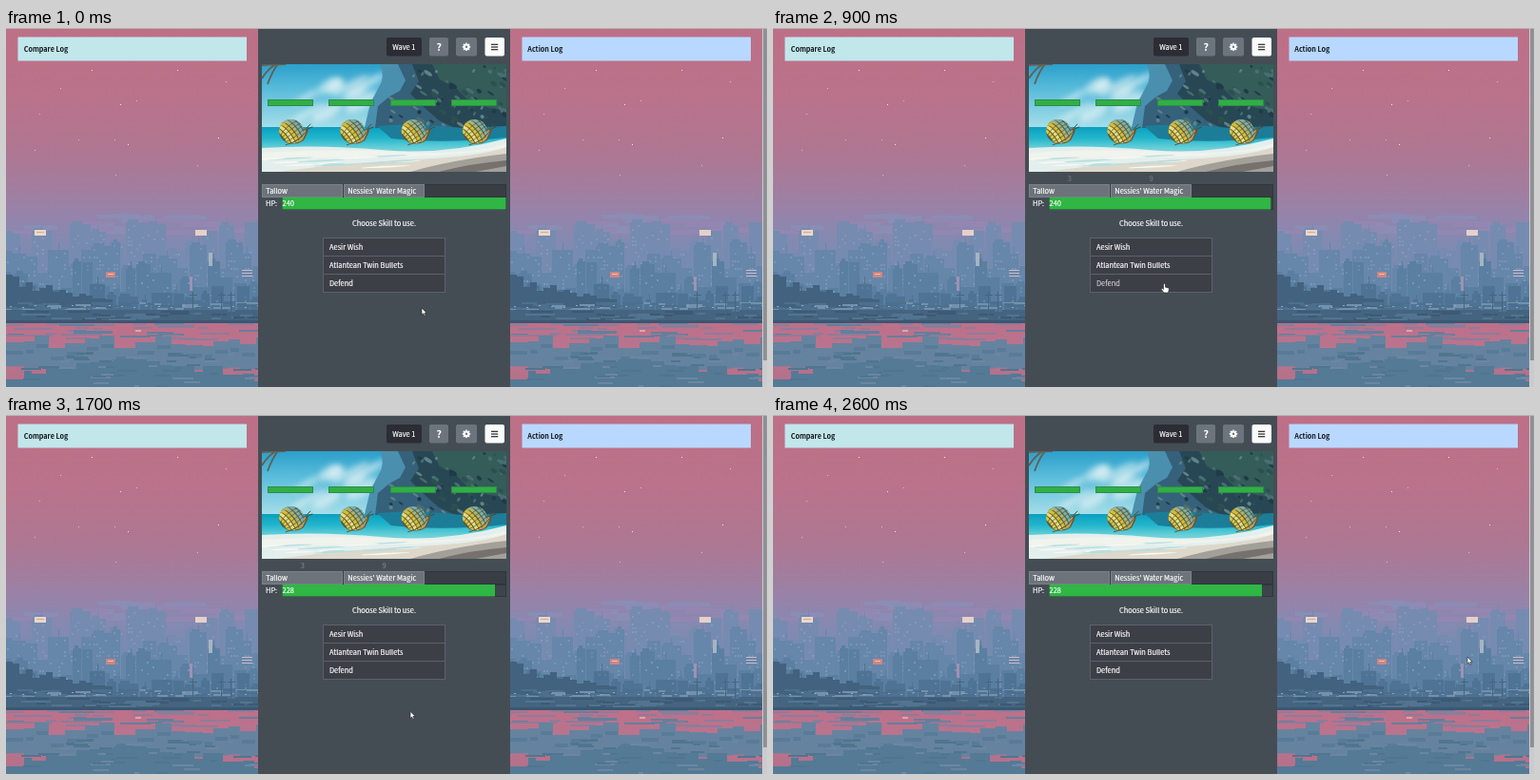
An HTML page with a canvas that plays this animation: 800x377 px, repeating every 2.7 s.

```html
<!DOCTYPE html>
<html lang="en">
<head>
<meta charset="utf-8">
<title>Wave battle</title>
<style>
html, body { margin: 0; width: 100%; height: 100%; overflow: hidden; background: #454d54; }
canvas, svg { position: absolute; left: 0; top: 0; width: 800px; height: 377px; display: block; }
text {
  font: 500 7.45px "Noto Sans CJK JP", "Noto Sans CJK SC", "Noto Sans CJK", "Noto Sans", sans-serif;
  fill: #fff; stroke: #fff; stroke-width: .18px;
}
.log { font-weight: 700; font-size: 7.2px; fill: #101418; stroke: none; }
.mid { text-anchor: middle; }
</style>
</head>
<body>
<canvas id="stage" width="800" height="377"></canvas>
<svg viewBox="0 0 800 377">
  <text class="log" x="18.7" y="24.8">Compare Log</text>
  <text class="log" x="548.3" y="24.8">Action Log</text>
  <text class="mid" x="418.3" y="22.7">Wave 1</text>
  <text class="mid" x="455.2" y="23.7" style="font-size:10.5px;font-weight:900">?</text>
  <g id="damage">
    <text class="mid" x="311.8" y="160.8">3</text>
    <text class="mid" x="397.5" y="160.8">9</text>
  </g>
  <text x="273.3" y="173.6">Tallow</text>
  <text x="359.3" y="173.6">Nessies' Water Magic</text>
  <text x="273" y="187">HP:</text>
  <rect id="bar" x="290.5" y="178" width="235" height="12.5" fill="#2fb644"/>
  <text id="hp" x="290.6" y="187">240</text>
  <text class="mid" x="397.5" y="207.8">Choose Skill to use.</text>
  <text x="340" y="232.5">Aesir Wish</text>
  <text x="340" y="251.7">Atlantean Twin Bullets</text>
  <text id="defend" x="340" y="270.8">Defend</text>
  <path id="arrow" d="M0 0V7.2L1.7 5.7 2.9 8.3 4.1 7.7 2.9 5.2H5.2Z" fill="#fff" stroke="#171b20" stroke-width=".6"/>
  <path id="hand" d="M-1 0Q0-1 1 0V3.2L4 4Q5 4.4 4.8 5.5L4 9H-.6L-3.2 5.6Q-3.2 4.3-1.9 4.7L-1 5.5Z" fill="#fff" stroke="#20242a" stroke-width=".6"/>
</svg>
<script>
const $ = id => document.getElementById(id);
const ctx = $('stage').getContext('2d');

const seeded = s => () => (s = (s * 16807) % 2147483647) / 2147483647;

function box(c, x, y, w, h, fill, line) {
  c.fillStyle = fill;
  c.fillRect(x, y, w, h);
  if (line) {
    c.strokeStyle = line;
    c.lineWidth = 1;
    c.strokeRect(x + .5, y + .5, w - 1, h - 1);
  }
}

function shape(c, fill, d) {
  c.fillStyle = fill;
  c.fill(new Path2D(d));
}

function blob(c, fill, x, y, rx, ry, turn = 0) {
  c.fillStyle = fill;
  c.beginPath();
  c.ellipse(x, y, rx, ry, turn, 0, 7);
  c.fill();
}

function fade(c, y0, y1, ...stops) {
  const g = c.createLinearGradient(0, y0, 0, y1);
  stops.forEach(([at, color]) => g.addColorStop(at, color));
  return g;
}

function skyline(c, rnd, base, low, high, fill, lights, density) {
  for (let x = -4; x < 265;) {
    const w = 9 + Math.floor(rnd() * 14), h = low + Math.floor(rnd() * (high - low));
    const top = base - h;
    box(c, x, top, w, h, fill);
    if (rnd() < .5) box(c, x + 2, top - 3, w / 2 | 0, 3, fill);
    if (rnd() < .25) box(c, x + (w / 2 | 0), top - 8, 1, 8, fill);
    for (let wy = top + 3; wy < base - 3; wy += 4)
      for (let wx = x + 2; wx < x + w - 2; wx += 3)
        if (rnd() < density) box(c, wx, wy, 2, 2, lights[rnd() * lights.length | 0]);
    x += w + Math.floor(rnd() * 4) - 1;
  }
}

function cityTile() {
  const tile = document.createElement('canvas');
  tile.width = 265;
  tile.height = 377;
  const c = tile.getContext('2d'), rnd = seeded(4127);
  box(c, 0, 0, 265, 377, fade(c, 0, 310, [0, '#bd7087'], [.25, '#b9738b'], [.43, '#ae7792'],
    [.54, '#a27d9e'], [.63, '#9683aa'], [.72, '#838ab1'], [1, '#6b89ac']));

  const stars = [[120, 80], [114, 117], [231, 56], [90, 44], [76, 117], [30, 128], [128, 122],
    [137, 76], [35, 90], [223, 115], [201, 144], [115, 154], [180, 44], [57, 63]];
  stars.forEach(([x, y], i) => box(c, x, y, 1, 1, i % 3 ? '#e3bac5' : '#f6e4e6'));

  for (let i = 0; i < 26; i++)
    box(c, rnd() * 265 - 15 | 0, 194 + rnd() * 22 | 0, 12 + rnd() * 38 | 0, 4, i % 2 ? '#9387b2' : '#8a8db5');
  skyline(c, rnd, 300, 60, 98, '#768bb0', ['#8298bd', '#8094b8'], .12);
  skyline(c, rnd, 300, 42, 76, '#6686aa', ['#7398b8', '#7c92b4'], .16);
  skyline(c, rnd, 300, 22, 56, '#5a7fa1', ['#6c9cb6', '#6a8cae'], .14);
  skyline(c, rnd, 300, 8, 32, '#4e7394', ['#5d8ba8', '#5c7e9e'], .12);

  box(c, 30, 212, 12, 6, '#ecd8c8');
  box(c, 32, 214, 8, 1, '#d6a7a2');
  box(c, 199, 212, 12, 6, '#e5d1c9');
  box(c, 105, 256, 10, 6, '#cc8584');
  box(c, 107, 258, 6, 1, '#efc3a6');
  for (let y = 254; y < 262; y += 3) box(c, 248, y, 11, 1, '#cdbcc6');
  box(c, 193, 261, 3, 15, '#a091b4');
  box(c, 213, 236, 4, 14, '#a4b5c2');

  // docks in front of the city
  for (let x = 0; x < 110; x += 7) {
    const h = 8 + (12 + rnd() * 18) * (1 - x / 110) | 0;
    box(c, x, 294 - h, 7, h, '#42627f');
  }
  for (let i = 0; i < 60; i++)
    box(c, rnd() * 265 - 8 | 0, 288 + rnd() * 9 | 0, 6 + rnd() * 18 | 0, 2, i % 3 ? '#4d6f8e' : '#7391ac');
  box(c, 0, 296, 265, 12, '#45647f');
  for (let i = 0; i < 30; i++)
    box(c, rnd() * 265 - 8 | 0, 296 + rnd() * 10 | 0, 8 + rnd() * 24 | 0, 2, i % 2 ? '#3c5975' : '#527490');
  for (let x = 4; x < 265; x += 13) box(c, x, 291 + x % 3, 2, 1, '#8fa6ba');
  box(c, 0, 307, 265, 3, '#3b5772');
  [196, 226, 236].forEach(x => {
    box(c, x, 277, 1, 29, '#46667f');
    box(c, x - 3, 280, 8, 1, '#46667f');
  });

  // water, mirrored skyline and the nearer shore
  box(c, 0, 310, 265, 67, fade(c, 310, 377, [0, '#be7089'], [.4, '#b9748e'], [1, '#b46f89']));
  for (let i = 0; i < 34; i++)
    box(c, rnd() * 265 - 10 | 0, 310 + rnd() * 17 | 0, 9 + rnd() * 35 | 0, 2, i % 3 ? '#8d7c9a' : '#647f9c');
  for (let x = -3; x < 265;) {
    const w = 8 + rnd() * 15 | 0, top = 323 + rnd() * 14 | 0;
    box(c, x, top, w, 355 - top + rnd() * 5, '#65839f');
    box(c, x + 2, top + 9, w - 3, 4, '#587b98');
    x += w;
  }
  for (let x = -3; x < 265;) {
    const w = 8 + rnd() * 16 | 0, inner = 1 - Math.abs(x - 125) / 140;
    const top = 364 - inner * 22 + rnd() * 8 | 0;
    box(c, x, top, w, 377 - top, '#547a96');
    x += w;
  }
  for (let i = 0; i < 44; i++)
    box(c, rnd() * 265 | 0, 340 + rnd() * 36 | 0, 5 + rnd() * 18 | 0, 2, i % 3 ? '#50758f' : '#6d86a0');
  box(c, 136, 317, 6, 2, '#e1a4a8');
  return tile;
}

function beach(c) {
  const rnd = seeded(931);
  c.save();
  c.beginPath();
  c.rect(269, 38, 257, 113);
  c.clip();
  box(c, 269, 38, 257, 70, fade(c, 38, 106, [0, '#2b9fcb'], [.4, '#5bbddb'], [1, '#a8dfe9']));
  c.filter = 'blur(3px)';
  c.globalAlpha = .6;
  for (let i = 0; i < 9; i++)
    blob(c, '#ecf6f7', 315 + rnd() * 75, 52 + rnd() * 45, 9 + rnd() * 16, 3 + rnd() * 6, -.5);
  c.filter = 'none';
  c.globalAlpha = 1;
  box(c, 269, 104, 257, 47, fade(c, 104, 151, [0, '#0b9fc0'], [.25, '#22b6cc'], [.48, '#6bd0d8'], [1, '#b8e0df']));

  // headland in three depths
  shape(c, '#4a8fae', 'M393 38Q399 52 392 62L383 79 377 104H526V38Z');
  shape(c, '#35617a', 'M412 38L420 55 414 66 403 72 391 82 388 105H526V38Z');
  shape(c, '#284754', 'M427 38L434 56 425 69 438 82 455 97 476 107H526V38Z');
  shape(c, '#345c59', 'M448 38L456 54 474 64 486 76 508 84 526 86V38Z');
  for (let i = 0; i < 90; i++) {
    const x = 402 + rnd() * 124, y = 40 + rnd() * 62;
    if (x < 428 && y < 74) continue;
    blob(c, ['#203a49', '#476f72', '#5e8388', '#2c5050'][i % 4], x, y, 1 + rnd() * 4, 1 + rnd() * 1.5, .6);
  }
  shape(c, '#1c7d99', 'M390 103Q430 99 480 105L526 103V115Q460 122 405 116Z');

  // foam, sand and wet shade
  shape(c, '#e3efed', 'M269 126Q330 122 395 128T526 116V151H269Z');
  shape(c, '#f1f3ed', 'M269 131Q350 126 420 130T526 121V126Q460 136 395 136T269 139Z');
  shape(c, '#ded8cb', 'M285 151Q360 141 430 138T526 125V151Z');
  shape(c, '#a3a09a', 'M425 151Q466 139 526 132V151Z');
  shape(c, '#76716c', 'M455 151Q490 142 526 139V145L494 151Z');
  for (let i = 0; i < 14; i++)
    blob(c, i % 2 ? '#b5dfe1' : '#f8f8f3', 275 + rnd() * 150, 133 + rnd() * 13, 9 + rnd() * 17, .8, -.05);

  c.strokeStyle = '#665e50';
  c.lineWidth = 1.8;
  c.stroke(new Path2D('M269 39Q285 38 294 38M286 38Q280 45 275 59M284 38Q276 42 269 53'));
  c.restore();
}

function snail(c, x) {
  c.save();
  c.translate(x, 110);
  c.lineCap = 'round';
  c.strokeStyle = '#4b4938';
  c.lineWidth = 1;
  c.stroke(new Path2D('M14-5L18-9M15-4L20-6'));
  shape(c, '#65583c', 'M-8 10Q3 14 11 8L15 0 16-5 12-4 8 3Z');
  shape(c, '#c7a358', 'M0 10Q6 11 10 7L14-2 12-3 8 4Z');
  c.beginPath();
  c.ellipse(-2, -1.5, 13, 12.5, .4, 0, 7);
  c.fillStyle = '#60593a';
  c.fill();
  c.save();
  c.clip();
  c.rotate(-.65);
  const bands = ['#dac842', '#eadc7d', '#d5bd35', '#a9b477', '#78afae', '#85bbb8'];
  c.lineWidth = 3.3;
  bands.forEach((color, i) => {
    c.strokeStyle = color;
    c.beginPath();
    c.ellipse(-14 + i * 4.4, -1, 4.5, 14, 0, -1.5, 1.5);
    c.stroke();
  });
  c.strokeStyle = '#4d5a42';
  c.lineWidth = .7;
  for (let y = -9; y < 10; y += 4.5) {
    c.beginPath();
    c.moveTo(-14, y * .6);
    c.quadraticCurveTo(0, y * 1.3, 14, y * .7);
    c.stroke();
  }
  c.restore();
  c.strokeStyle = '#5c573b';
  c.lineWidth = 1;
  c.stroke();
  c.restore();
}

function gear(c, x, y) {
  c.fillStyle = '#fff';
  for (let i = 0; i < 8; i++) {
    c.save();
    c.translate(x, y);
    c.rotate(i * Math.PI / 4);
    c.fillRect(-.9, -4.2, 1.8, 2.5);
    c.restore();
  }
  c.strokeStyle = '#fff';
  c.lineWidth = 1.8;
  c.beginPath();
  c.arc(x, y, 2.2, 0, 7);
  c.stroke();
}

function pill(c, x, w, fill) {
  c.fillStyle = fill;
  c.beginPath();
  c.roundRect(x, 10, w, 19.5, 2);
  c.fill();
}

function drawStage() {
  const city = cityTile();
  ctx.drawImage(city, 0, 0);
  ctx.drawImage(city, 530, 0);
  box(ctx, 795, 0, 5, 377, '#c9cbce');
  box(ctx, 796, 0, 4, 349, '#8f9194');
  box(ctx, 265, 0, 265, 377, '#454d54');
  box(ctx, 0, 0, 800, 1, '#b2b2b5');
  box(ctx, 12.5, 9.5, 240.5, 25, '#c1e7eb');
  box(ctx, 542.5, 9.5, 240.5, 25, '#b9d8ff');

  pill(ctx, 400, 37, '#2b2c34');
  pill(ctx, 445, 20, '#6c757d');
  pill(ctx, 473, 22, '#6c757d');
  pill(ctx, 503.5, 20.5, '#fbfbfb');
  gear(ctx, 484, 19.8);
  [16.7, 19.4, 22.1].forEach(y => box(ctx, 510, y, 7.2, 1.2, '#25282c'));

  beach(ctx);
  [275, 339, 404, 468].forEach((x, i) => {
    box(ctx, x, 75, 48, 7, '#2fb044', '#31894c');
    snail(ctx, 302 + i * 64.3);
  });

  box(ctx, 269, 164, 257, 14, '#393e45', '#30353b');
  box(ctx, 269, 164, 85, 14, '#6d737a', '#7b8288');
  box(ctx, 355, 164, 85, 14, '#6d737a', '#7b8288');
  box(ctx, 290, 178, 236, 13, '#3d444b', '#30363c');
  box(ctx, 333, 220, 129, 58, '#3d3f47', '#5c6269');
  box(ctx, 334, 239, 127, 1, '#5c6269');
  box(ctx, 334, 258, 127, 1, '#5c6269');
}

// time in ms, then the values reached there
const pointer = [[0, 437, 294], [200, 437, 294], [500, 411.5, 269], [1000, 411.5, 269],
  [1300, 411.5, 311], [1600, 411.5, 311], [1900, 452, 312], [2300, 708, 289], [2600, 730, 254]];
const damage = [[800, 0], [900, .22], [1200, .9], [1500, .85], [1800, 0]];
const barWidth = [[800, 235], [1300, 223.5]];

function at(keys, t) {
  const i = keys.findIndex(k => k[0] > t);
  if (i === 0) return keys[0].slice(1);
  if (i < 0) return keys[keys.length - 1].slice(1);
  const a = keys[i - 1], b = keys[i], p = (t - a[0]) / (b[0] - a[0]);
  return a.slice(1).map((v, n) => v + (b[n + 1] - v) * p);
}

function render(now) {
  const t = Math.floor(now % 2700 / 100) * 100;
  const [x, y] = at(pointer, t);
  const onList = x > 333 && x < 462 && y > 220 && y < 278;
  $('arrow').style.display = onList ? 'none' : '';
  $('hand').style.display = onList ? '' : 'none';
  $(onList ? 'hand' : 'arrow').setAttribute('transform', `translate(${x} ${y})`);
  const hover = onList && y > 258;
  $('defend').style.fill = hover ? '#e2e4e6' : '#fff';
  $('defend').style.stroke = hover ? 'none' : '';
  $('damage').setAttribute('opacity', at(damage, t)[0]);
  $('bar').setAttribute('width', at(barWidth, t)[0]);
  $('hp').textContent = t < 1000 ? 240 : 228;
}

function tick() {
  render(performance.now());
  requestAnimationFrame(tick);
}

drawStage();
tick();
</script>
</body>
</html>
```
